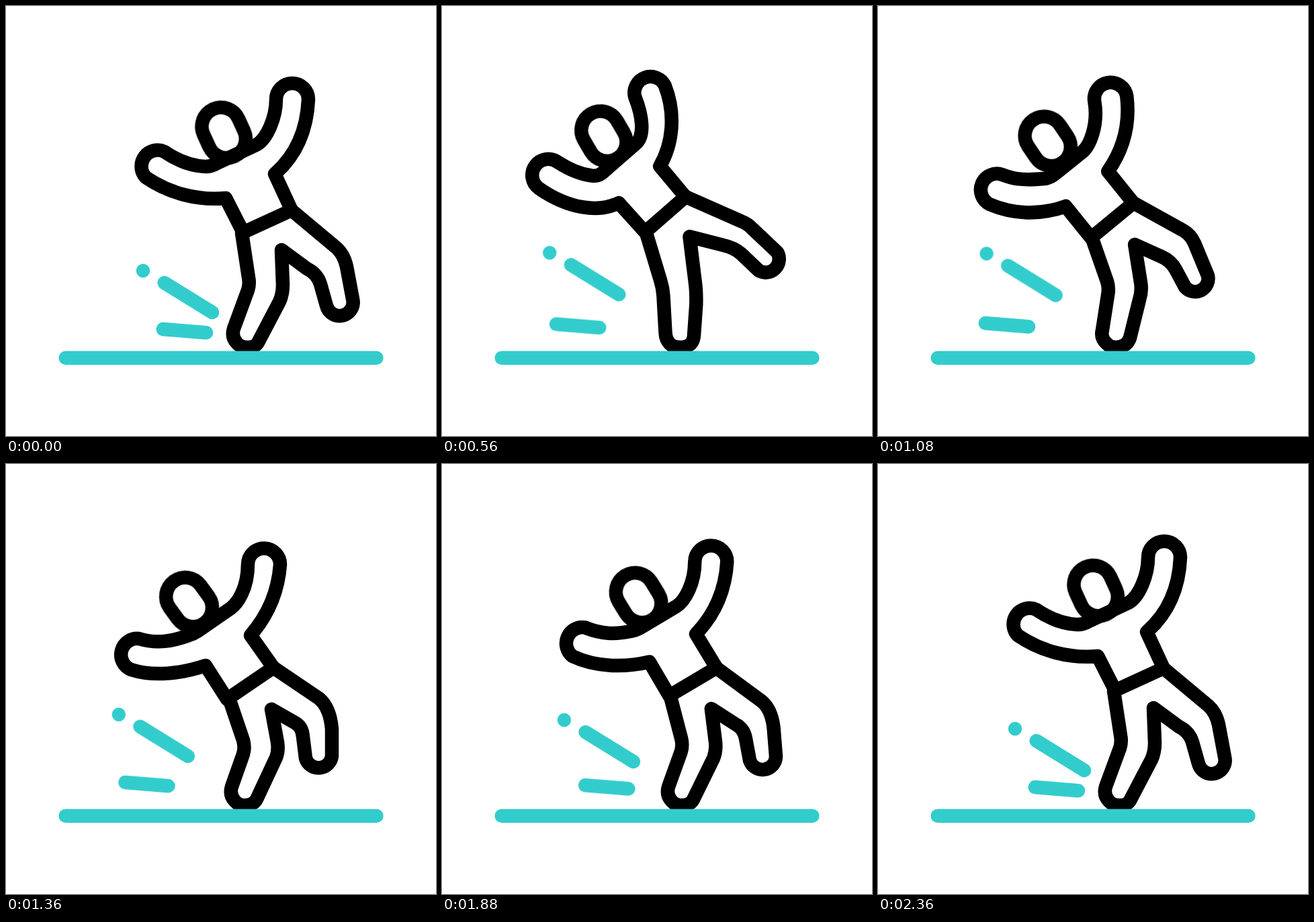
An HTML page without scripts for the animation above (2.4 s loop, 640 px wide and 640 px high).

```html
<!DOCTYPE html>
<html lang="en">
<head>
<meta charset="utf-8">
<title>Slipping figure</title>
<style>
html, body { margin: 0; width: 100%; height: 100%; overflow: hidden; background: #fff; }
svg { display: block; width: 100%; height: 100%; }
.man, .teal { fill: none; stroke-width: 20.5; stroke-linecap: round; stroke-linejoin: round; }
.man { stroke: #000; }
.teal { stroke: #33cccc; }
.torso, .legs, .head, .spark { animation: torso 2400ms cubic-bezier(.33, 0, .67, 1) infinite; }
.legs { animation-name: legs; }
.head { animation-name: head; }
.spark { animation-name: spark; }
.skid { animation: skid 2400ms linear infinite; }

/* left side, left arm, shoulders, right arm, belt */
@keyframes torso {
  0%, 5.42%, 89.17%, 100% {
    d: path("M353 337L327 286C286 290 243 279 208 255A24 24 0 0 1 236 217C255 230 274 238 297 239Q305 239 312 235L372 207C389 198 402 165 402 139A24 24 0 0 1 450 139C448 185 432 222 400 250L425 304Z");
    animation-timing-function: cubic-bezier(.33, 0, .67, .5);
  }
  15% {
    d: path("M331 333L298 287C262 296 222 289 180 260A24 24 0 0 1 209 221C229 236 246 240 262 242Q271 243 280 237L335 202C353 190 354 165 350 131A24 24 0 0 1 398 126C404 165 396 207 367 241L399 291Z");
    animation-timing-function: cubic-bezier(.33, .5, .67, 1);
  }
  27.08%, 34.17% {
    d: path("M298 337L258 294C230 309 185 305 139 273A24 24 0 0 1 167 234C183 244 200 252 217 254Q227 256 235 248L282 205C294 194 291 165 278 136A24 24 0 0 1 322 117C340 160 336 205 318 238L357 283Z");
    animation-timing-function: cubic-bezier(.33, 0, .67, .5);
  }
  45% {
    d: path("M317 345L279 298C241 312 201 310 166 295A24 24 0 0 1 185 251C201 257 212 260 247 257Q256 256 262 251L303 218C315 209 328 177 322 142A24 24 0 0 1 370 134C375 175 366 212 342 246L380 293Z");
    animation-timing-function: cubic-bezier(.33, .5, .67, 1);
  }
  54.17%, 70.42% {
    d: path("M329 350L297 300C261 312 220 317 186 306A24 24 0 0 1 198 260C225 268 247 264 272 255Q279 253 285 249L334 215C344 208 360 186 360 149A24 24 0 0 1 408 150C405 190 390 225 364 255L398 303Z");
  }
}

/* standing leg, crotch, kicking leg */
@keyframes legs {
  0%, 5.42%, 89.17%, 100% {
    d: path("M351 338L361 404Q363 414 360 423L339 480Q335 493 344 502Q349 508 360 508Q371 508 375 501L407 440Q412 429 412 415L410 363L448 391Q463 398 468 414L477 446A20 20 0 0 0 516 436L507 388Q503 370 492 360L425 304");
    animation-timing-function: cubic-bezier(.33, 0, .67, .5);
  }
  15% {
    d: path("M331 337L345 405Q347 415 346 425L336 480Q333 493 340 501Q345 508 357 508Q371 508 376 496L394 436Q397 426 397 412L392 352L440 376Q454 382 462 396L477 421A20 20 0 0 0 512 403L489 356Q482 344 473 339L399 291");
    animation-timing-function: cubic-bezier(.33, .5, .67, 1);
  }
  27.08%, 34.17% {
    d: path("M300 338L322 408Q326 420 327 432L332 487Q333 497 339 503Q344 508 354 508Q375 508 375 488L376 445Q376 425 374 412L365 342L415 353Q432 356 443 365L471 390A20 20 0 0 0 497 361L458 328Q451 321 442 318L358 283");
    animation-timing-function: cubic-bezier(.33, 0, .67, .5);
  }
  45% {
    d: path("M319 347L341 410Q344 420 342 430L334 482Q331 494 340 502Q345 508 354 508Q370 508 375 494L389 437Q393 425 391 412L382 355L422 373Q436 379 443 392L457 418A19.5 19.5 0 0 0 491 401L471 353Q465 340 454 334L380 293");
    animation-timing-function: cubic-bezier(.33, .5, .67, 1);
  }
  54.17%, 70.42% {
    d: path("M333 352L353 411Q356 422 353 432L336 480Q332 493 341 502Q346 508 356 508Q368 508 373 499L402 437Q406 427 404 414L395 365L430 385Q441 391 442 406L446 438A20 20 0 0 0 485 435L485 394Q482 362 466 349L398 303");
  }
}

@keyframes head {
  0%, 5.42%, 89.17%, 100% {
    transform: translate(320px, 179.5px) rotate(-24.6deg);
    animation-timing-function: cubic-bezier(.33, 0, .67, .5);
  }
  15% {
    transform: translate(282.7px, 178.7px) rotate(-27.5deg);
    animation-timing-function: cubic-bezier(.33, .5, .67, 1);
  }
  27.08%, 34.17% {
    transform: translate(229px, 186px) rotate(-30.7deg);
    animation-timing-function: cubic-bezier(.33, 0, .67, .5);
  }
  45% {
    transform: translate(247px, 193px) rotate(-34deg);
    animation-timing-function: cubic-bezier(.33, .5, .67, 1);
  }
  54.17%, 70.42% { transform: translate(266.7px, 197.5px) rotate(-36deg); }
}

@keyframes spark {
  0%, 5.42%, 89.17%, 100% { transform: translate(0, 0); }
  27.08%, 35.8% { transform: translate(-47.5px, -29px); }
  55.8%, 70.42% { transform: translate(-36.2px, -21.2px); }
}

@keyframes skid {
  0%, 8% { transform: translate(0, 0); animation-timing-function: cubic-bezier(.33, 0, .67, 1); }
  31.67% { transform: translate(-89px, -10.5px); animation-timing-function: cubic-bezier(.4, .1, .7, .6); }
  45% { transform: translate(-74px, -9px); }
  71.67% { transform: translate(-34px, -4.8px); }
  85% { transform: translate(-7.5px, -1px); animation-timing-function: cubic-bezier(.3, .7, .6, 1); }
  100% { transform: translate(0, 0); }
}
</style>
</head>
<body>
<svg viewBox="0 0 640 640">
  <g class="man">
    <path class="legs"/>
    <path class="torso"/>
    <rect class="head" x="-28.5" y="-28.5" width="57" height="77" rx="28.5"/>
  </g>
  <g class="teal">
    <path class="spark" d="M204 394h.01M235.7 412L307 456"/>
    <path class="skid" d="M233.7 481L298 486.3"/>
    <path d="M88.7 523.8H551.4"/>
  </g>
</svg>
</body>
</html>
```
